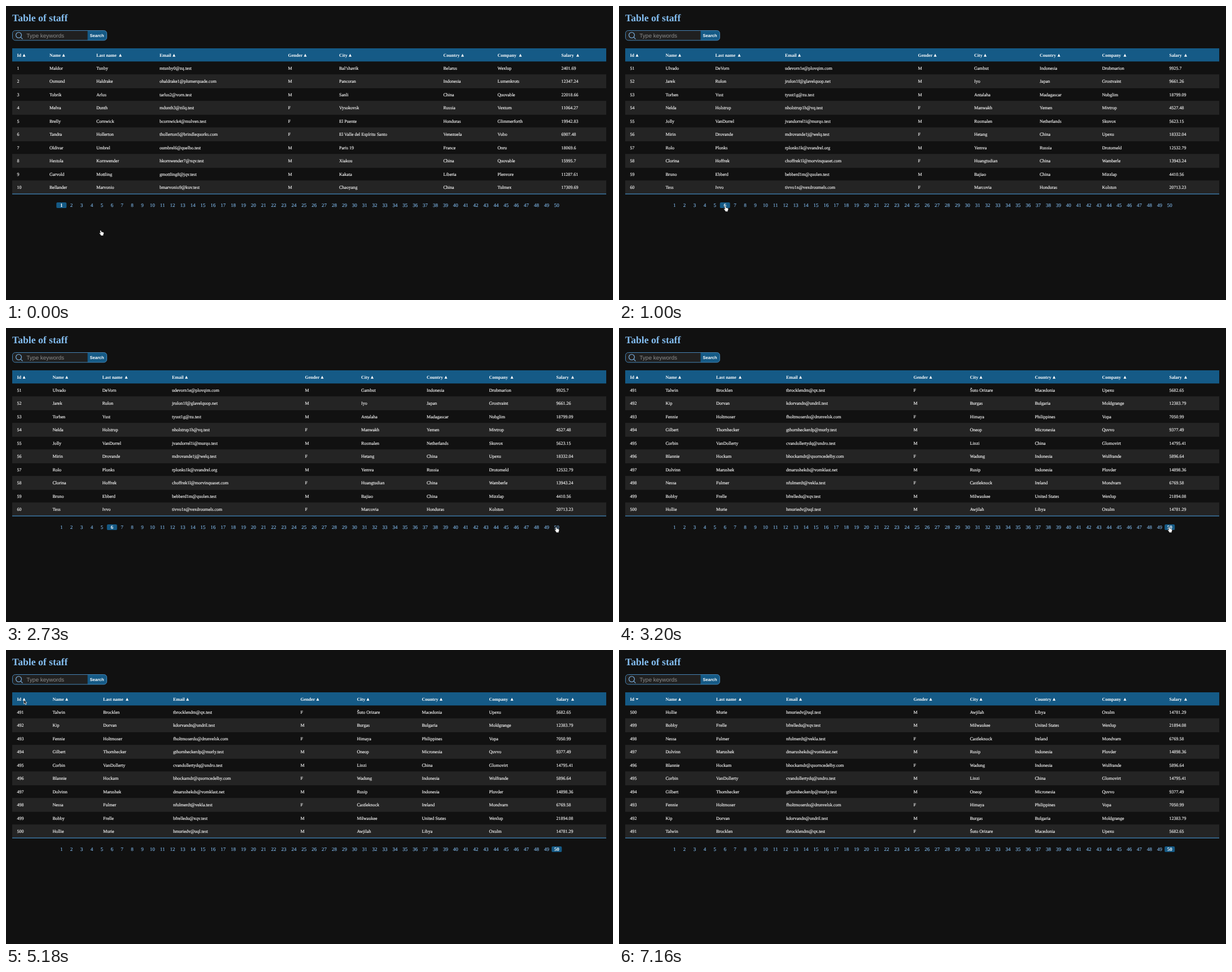
These frames come from a looping animation (1075 px wide and 521 px high, 8000 ms). An HTML page:

```html
<!DOCTYPE html>
<html lang="en">
<head>
<meta charset="utf-8">
<title>Table of staff</title>
<style>
html, body { margin: 0; width: 100%; height: 100%; overflow: hidden; background: #111; }
svg { display: block; }
text { font-family: "Liberation Serif", "Times New Roman", serif; text-rendering: geometricPrecision; white-space: pre; }
.title { font-size: 17.65px; font-weight: 700; fill: #83bdf0; }
.cell { font-size: 8.03px; fill: #fff; stroke: #fff; stroke-width: .13px; }
.head { font-size: 8.03px; font-weight: 700; fill: #fff; }
.page { font-size: 9px; fill: #80bbee; stroke: #80bbee; stroke-width: .1px; text-anchor: middle; }
.page.active { fill: #fff; stroke: none; font-weight: 700; }
.sans { font-family: "Liberation Sans", Arial, sans-serif; }
</style>
</head>
<body>
<svg id="stage" width="1075" height="521" viewBox="0 0 1075 521"></svg>
<script>
const LOOP = 8000, ROW = 23.5, TOP = 98.3, BLUE = '#155a86';
const stage = document.getElementById('stage');

function add(parent, tag, attrs = {}, text) {
  const node = document.createElementNS('http://www.w3.org/2000/svg', tag);
  for (const name in attrs) node.setAttribute(name, attrs[name]);
  if (text !== undefined) node.textContent = text;
  parent.appendChild(node);
  return node;
}
const label = (parent, cls, x, y, text) => add(parent, 'text', { class: cls, x, y }, text);
const box = (parent, x, y, width, height, fill, more) =>
  add(parent, 'rect', { x, y, width, height, fill, ...more });

// Header titles with the distance from the column edge to the sort arrow
const headers = [['Id', 12.5], ['Name', 25], ['Last name', 42.5], ['Email', 25.5], ['Gender', 30.5],
  ['City', 19.5], ['Country', 34], ['Company', 40.5], ['Salary', 29]];

// first name | last name | mail domain | gender | city | country | company | salary
const pages = [
  { number: 1, columns: [19.5, 77, 160, 272, 499.5, 590, 774.5, 870.5, 983.5], rows: `
Maldor|Tunby|zq.test|M|Bal’shavik|Belarus|Wexlup|2401.69
Osmund|Haldrake|plumerquade.com|M|Pancoran|Indonesia|Lumenkrots|12347.24
Tobrik|Arlus|vorn.test|M|Sanli|China|Quovable|22018.66
Melva|Dunth|zilq.test|F|Vysokovsk|Russia|Vextorn|11064.27
Brelly|Cornwick|mulven.test|F|El Puente|Honduras|Glimmerforth|19942.83
Tandra|Hollerton|brindlequorks.com|F|El Valle del Espíritu Santo|Venezuela|Vubo|6907.48
Oldivar|Umbrel|quelbo.test|M|Paris 19|France|Onru|18069.6
Hestola|Kornwender|xqv.test|M|Xiakou|China|Quovable|15995.7
Garvold|Mottling|jqv.test|M|Kakata|Liberia|Plenvore|11287.61
Bellander|Marvonio|kuv.test|M|Chaoyang|China|Tulmex|17309.69` },
  { number: 6, columns: [19.5, 82.5, 170.5, 294, 529.5, 629, 745, 855.5, 974.5], rows: `
Ulvado|DeVorn|plovqim.com|M|Gambut|Indonesia|Drubmarion|9925.7
Jarek|Rulon|glavelquop.net|M|Iyo|Japan|Grostvaint|9661.26
Torben|Yust|zu.test|M|Antalaha|Madagascar|Nubglim|18799.09
Nelda|Holstrup|vq.test|F|Manwakh|Yemen|Mivtrop|4527.48
Jolly|VanDorrel|murqo.test|M|Rosmalen|Netherlands|Skuvox|5623.15
Mirin|Drovande|welq.test|F|Hetang|China|Upexu|18332.04
Rolo|Plonks|uvandrel.org|M|Yemva|Russia|Drotomeld|12532.79
Clorina|Hoffrek|morvinquaset.com|F|Huangtudian|China|Wamberle|13943.24
Bruno|Ebberd|quolen.test|M|Bajiao|China|Mizzlap|4410.56
Tess|Ivvo|vexdroumels.com|F|Marcovia|Honduras|Kolstun|20713.23` },
  { number: 50, columns: [19.5, 82.5, 172, 296, 521.5, 621.5, 736.5, 855.5, 974.5], rows: `
Talwin|Brocklen|qx.test|F|Šuto Orizare|Macedonia|Upexu|5682.65
Kip|Dorvan|undril.test|M|Burgas|Bulgaria|Moldgrange|12383.79
Fennie|Holtmoser|drunvelsk.com|F|Himaya|Philippines|Vopa|7050.99
Gilbert|Thornhecker|murly.test|M|Oneop|Micronesia|Quvvo|9377.49
Corbin|VanDollerty|undro.test|M|Linzi|China|Glomovirt|14795.41
Blannie|Hockam|quorncedelby.com|F|Wadung|Indonesia|Wulfrande|5896.64
Dolvinn|Marushek|vomklast.net|M|Rusip|Indonesia|Pluvder|14898.36
Nessa|Fulmer|vekla.test|F|Castleknock|Ireland|Mondvarn|6769.58
Bobby|Frelle|xqv.test|M|Milwaukee|United States|Wexlup|21894.08
Hollie|Murie|uql.test|M|Awjilah|Libya|Oxulm|14781.29` }
];

function parseRows(page) {
  return page.rows.trim().split('\n').map((line, i) => {
    const [first, last, domain, ...rest] = line.split('|');
    const id = (page.number - 1) * 10 + i + 1;
    const mail = (first[0] + last).toLowerCase() + (id - 1).toString(36) + '@' + domain;
    return [id, first, last, mail, ...rest];
  });
}

function buildView(page, descending) {
  const view = add(stage, 'g');
  headers.forEach(([title, offset], c) => {
    const x = page.columns[c], mid = x + offset;
    label(view, 'head', x, 89.5, title);
    const points = descending && c === 0
      ? `${mid - 2.6},85.7 ${mid + 2.6},85.7 ${mid},88.6`
      : `${mid - 2.5},89.7 ${mid + 2.5},89.7 ${mid},84.7`;
    add(view, 'polygon', { points, fill: '#fff' });
  });
  const rows = parseRows(page);
  if (descending) rows.reverse();
  rows.forEach((row, r) => row.forEach((value, c) =>
    label(view, 'cell', page.columns[c], 112.5 + r * ROW, value)));
  const pageX = n => 98.2 + (n - 1) * 17.9;
  box(view, pageX(page.number) - 9, 347.9, 18, 10.2, BLUE, { rx: 2.2 });
  for (let n = 1; n <= 50; n++)
    label(view, n === page.number ? 'page active' : 'page', pageX(n), 356, n);
  return view;
}

function buildFrame() {
  label(stage, 'title', 11, 27.2, 'Table of staff');
  box(stage, 11.5, 43.5, 167, 17.4, '#202020', { rx: 5 });
  add(stage, 'path', { d: 'M144.5 43.5H173.5a5 5 0 0 1 5 5v7.4a5 5 0 0 1-5 5H144.5z', fill: BLUE });
  box(stage, 11.5, 43.5, 167, 17.4, 'none', { rx: 5, stroke: '#4684b4' });
  add(stage, 'path', { d: 'M17.6 51.6a4.9 4.9 0 1 0 9.8 0a4.9 4.9 0 1 0-9.8 0M26 55.2l3.4 3.4',
    fill: 'none', stroke: '#83bdf0', 'stroke-width': 1.1 });
  add(stage, 'text', { class: 'sans', x: 36.3, y: 56.4, 'font-size': 10, fill: '#8c8c8c' }, 'Type keywords');
  add(stage, 'text', { class: 'sans', x: 148.6, y: 54.9, 'font-size': 7.5, 'font-weight': 700, fill: '#fff' }, 'Search');
  box(stage, 11, 75, 1052, TOP - 75, BLUE);
  for (let r = 0; r < 10; r++) {
    if (r % 2) box(stage, 11, TOP + r * ROW, 1052, ROW, '#242424');
    box(stage, 11, TOP + (r + 1) * ROW - .5, 1052, .5, '#303030');
  }
  box(stage, 11, 332.4, 1052, 1.4, '#3b7aa9');
}

buildFrame();
const views = [buildView(pages[0]), buildView(pages[1]), buildView(pages[2]), buildView(pages[2], true)];
const switches = [1000, 3200, 6750];

const pointer = add(stage, 'g');
const shapes = {
  hand: add(pointer, 'path', { fill: '#fff', stroke: '#111', 'stroke-width': .5, 'stroke-linejoin': 'round',
    d: 'M-2.2-4.4q.9-.9 1.6.3l.9 2.2q.9-.6 1.4.2q.9-.4 1.3.4q1.2-.3 1.2 1.1q.2 1.7-.8 3.1v1.7h-4.2q-.5-1.5-2.5-3.6q-.8-1.2.1-1.5q.7 0 1.6.9l-.9-3.6q-.1-.8.3-1.2z' }),
  arrow: add(pointer, 'path', { fill: '#111', stroke: '#fff', 'stroke-width': .7, 'stroke-linejoin': 'round',
    d: 'M-2.7-4.2v7.2l1.7-1.5l1.2 2.8l1.3-.6l-1.2-2.7h2.3z' }),
  beam: add(pointer, 'path', { fill: 'none', stroke: '#e0e0e0', 'stroke-width': .9,
    d: 'M-2.2-4.6Q0-4.6 0-3.6Q0-4.6 2.2-4.6M0-3.6V3.6M-2.2 4.6Q0 4.6 0 3.6Q0 4.6 2.2 4.6M-1.2 1.5H1.2' })
};

// The pointer hops along each curve: first hop, last hop, hop count, bend, end
const moves = [
  [110, 540, 7, [207, 375], [190, 362]],
  [680, 710, 2, [190, 361], [189.4, 359.6]],
  [1780, 2520, 9, [800, 300], [1036, 331]],
  [2590, 2730, 3, [1000, 350], [975.5, 357.8]],
  [3620, 3890, 4, [560, 270], [184.5, 174]],
  [3980, 4310, 6, [90, 125], [44.3, 107]],
  [4430, 4700, 5, [38, 96], [34.4, 87]],
  [4870, 4870, 1, [34.4, 88], [34.4, 89]],
  [5040, 5180, 3, [34.4, 91], [34.4, 92.6]]
];
const smooth = k => k * k * (3 - 2 * k);

function pointerAt(t) {
  let from = [169, 402.3];
  for (const [start, end, hops, bend, to] of moves) {
    if (t < start) break;
    const gap = (end - start) / (hops - 1) || 1;
    const hop = Math.min(hops, Math.floor((t - start) / gap + 1e-6) + 1);
    const k = smooth(hop / hops);
    const here = from.map((a, i) => (1 - k) ** 2 * a + 2 * k * (1 - k) * bend[i] + k * k * to[i]);
    if (hop < hops) return here;
    from = to;
  }
  return from;
}

function render(t) {
  const current = switches.filter(s => t >= s).length;
  views.forEach((view, i) => view.setAttribute('display', i === current ? 'inline' : 'none'));
  const [x, y] = pointerAt(t);
  const kind = y > 345 ? 'hand' : y < TOP ? 'arrow' : 'beam';
  for (const name in shapes) shapes[name].setAttribute('display', name === kind ? 'inline' : 'none');
  pointer.setAttribute('transform', `translate(${x} ${y})`);
  pointer.setAttribute('display', t < 7160 ? 'inline' : 'none');
}

const began = performance.now();
function tick() {
  render((performance.now() - began) % LOOP);
  requestAnimationFrame(tick);
}
tick();
</script>
</body>
</html>
```
